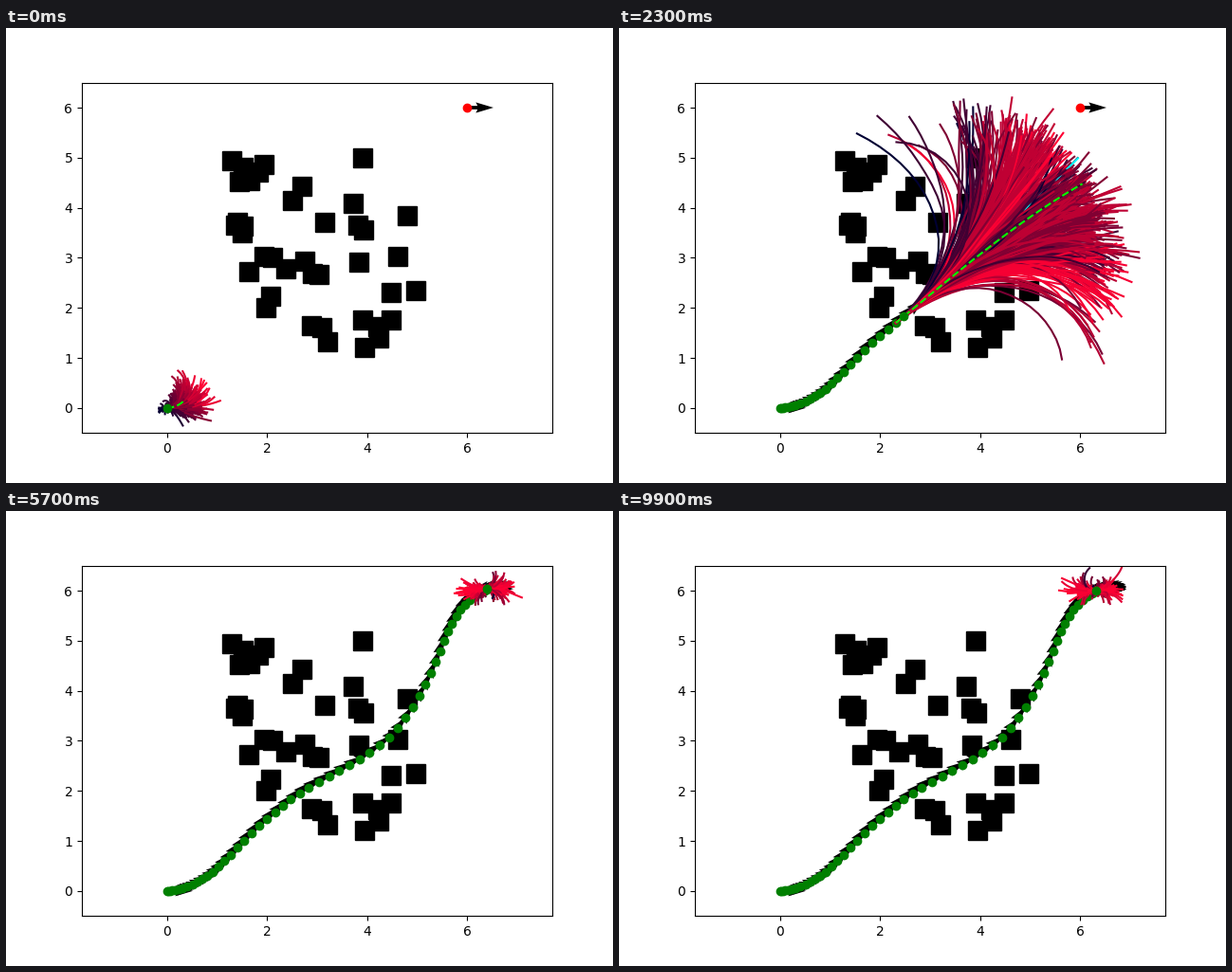
Recreate the animation shown at these times as a matplotlib script. Size 640 by 480 pixels, loop 10000 ms.

```python
import numpy as np
import matplotlib.pyplot as plt
from matplotlib.animation import FuncAnimation
from matplotlib.collections import LineCollection

FRAMES, HORIZON, SAMPLES = 100, 20, 500
GOAL = np.array([6.0, 6.0])
HIT_RADIUS = 0.17
BEST = 330

OBSTACLES = np.array([
    (1.29, 4.94), (1.52, 4.81), (1.44, 4.53), (1.65, 4.55), (1.82, 4.72),
    (1.94, 4.87), (2.70, 4.43), (2.51, 4.15), (3.91, 4.99), (3.72, 4.08),
    (4.80, 3.84), (3.15, 3.70), (3.82, 3.66), (3.93, 3.56), (1.37, 3.66),
    (1.41, 3.70), (1.53, 3.63), (1.50, 3.50), (1.94, 3.02), (2.11, 3.00),
    (1.63, 2.73), (2.38, 2.78), (2.76, 2.93), (2.91, 2.69), (3.04, 2.67),
    (3.84, 2.91), (4.61, 3.02), (4.48, 2.31), (4.97, 2.35), (2.07, 2.23),
    (1.98, 2.01), (2.88, 1.64), (3.09, 1.61), (3.21, 1.33), (3.91, 1.75),
    (3.95, 1.20), (4.21, 1.62), (4.23, 1.39), (4.48, 1.75)])

# Robot position every third step until it settles near the goal
WAYPOINTS = np.array([
    (0, 0), (0.10, 0.01), (0.32, 0.06), (0.61, 0.18), (0.91, 0.38),
    (1.27, 0.72), (1.69, 1.155), (2.16, 1.57), (2.65, 1.95), (3.24, 2.29),
    (3.845, 2.633), (4.432, 3.068), (4.905, 3.674), (5.275, 4.347),
    (5.54, 5.0), (5.777, 5.492), (6.04, 5.814), (6.307, 5.985), (6.40, 6.03)])
WAY_STEP = 3
SETTLED = WAY_STEP * (len(WAYPOINTS) - 1)

# step, planned end speed, linear and quadratic turn over the horizon
PLANS = np.array([
    (0, 0.028, 0.2, 0.6),
    (4, 0.20, 0.6, 0.2),
    (9, 0.31, 0.5, -0.2),
    (15, 0.205, -0.1, -0.75),
    (23, 0.245, 0.1, -0.25),
    (33, 0.232, 1.7, -1.9),
    (38, 0.12, 0.5, -1.2),
    (45, 0.0, -1.2, 0.0),
    (54, 0.0, 0.0, 0.0)])


def hermite(points, s):
    slopes = np.gradient(points, axis=0)
    i = np.minimum(s.astype(int), len(points) - 2)
    u = (s - i)[:, None]
    return ((2 * u**3 - 3 * u**2 + 1) * points[i] + (u**3 - 2 * u**2 + u) * slopes[i]
            + (3 * u**2 - 2 * u**3) * points[i + 1] + (u**3 - u**2) * slopes[i + 1])


def build_route():
    steps = np.arange(FRAMES)
    drive = steps[:SETTLED + 1]
    pos = np.empty((FRAMES, 2))
    pos[:SETTLED + 1] = hermite(WAYPOINTS, drive / WAY_STEP)
    sway = np.cos(2 * np.pi * (steps[SETTLED + 1:] - 55.5) / 29)
    pos[SETTLED + 1:] = np.c_[6.355 + 0.045 * sway, 6.015 + 0.015 * sway]

    vel = np.gradient(pos[:SETTLED + 1], axis=0)
    tangent = np.arctan2(vel[:, 1], vel[:, 0])
    tangent[0] = 0
    heading = 0.06 + 0.07 * np.sin(0.9 * steps)
    ease = np.clip((drive - 49) / 6, 0, 1)
    heading[:SETTLED + 1] = (1 - ease) * tangent + ease * 0.06
    speed = np.zeros(FRAMES)
    speed[1:SETTLED + 1] = np.hypot(*vel[1:].T)
    return pos, heading, speed


POS, HEADING, SPEED = build_route()
LEAD = 0.08 * np.clip(np.arange(FRAMES) / 8, 0, 1) * (np.arange(FRAMES) <= SETTLED)


def rollout(start, theta, speed):
    moves = np.stack([speed * np.cos(theta), speed * np.sin(theta)], axis=-1)
    origin = np.zeros_like(moves[:, :1])
    return start + np.concatenate([origin, np.cumsum(moves, axis=1)], axis=1)


def sample_paths(t):
    """Plan and noisy rollouts from the state before step t, with colours."""
    s = max(t - 1, 0)
    end_speed, turn, bend = (np.interp(t, PLANS[:, 0], c) for c in PLANS[:, 1:].T)
    u = np.arange(1, HORIZON + 1) / HORIZON
    theta = HEADING[s] + turn * u + bend * u**2
    speed = SPEED[s] + (end_speed - SPEED[s]) * (2 * u - u**2)

    rng = np.random.default_rng(t)
    shape = (SAMPLES, HORIZON)
    accel = rng.normal(0, 0.0045, shape)
    spin = rng.normal(0, 0.0145, shape)
    accel[BEST] = 0.0012
    spin[BEST] = 0.0012 * np.sin(1.4 * t + 1)
    swerve = np.cumsum(np.cumsum(spin, axis=1), axis=1)
    paths = rollout(POS[s], theta + swerve, speed + np.cumsum(accel, axis=1))
    plan = rollout(POS[s], theta[None], speed[None])[0]

    gap = np.linalg.norm(paths[:, :, None] - OBSTACLES, axis=-1)
    hits = (gap < HIT_RADIUS).any(axis=2).sum(axis=1)
    dist = np.linalg.norm(paths[:, -1] - GOAL, axis=1)
    near = np.linalg.norm(POS[s] - GOAL) < 1.2
    cost = hits + 0.05 * dist + near * swerve[:, -1]**2
    good = 1 - (cost - cost.min()) / np.ptp(cost)
    colors = np.c_[good, np.zeros(SAMPLES), np.full(SAMPLES, 0.2)]
    colors[BEST] = (0, 1, 1)
    return plan, paths, colors


def arrows(ax, pos, angle):
    ax.quiver(pos[:, 0], pos[:, 1], np.cos(angle), np.sin(angle),
              scale=18, width=0.0075)


fig, ax = plt.subplots(figsize=(6.4, 4.8), dpi=100)


def draw(t):
    ax.clear()
    ax.set_xlim(-1.697, 7.697)
    ax.set_ylim(-0.5, 6.5)
    ax.set_xticks(range(0, 7, 2))
    ax.set_yticks(range(7))
    ax.plot(*OBSTACLES.T, "ks", markersize=15)
    ax.plot(*GOAL, "ro")
    arrows(ax, GOAL[None], np.zeros(1))

    arrows(ax, POS[:t + 1], (HEADING + LEAD)[:t + 1])
    ax.plot(*POS[:max(t, 1)].T, "go")
    plan, paths, colors = sample_paths(t)
    ax.add_collection(LineCollection(paths, colors=colors, linewidths=1.5,
                                     capstyle="projecting", zorder=2),
                      autolim=False)
    ax.plot(*plan.T, "--", color="lime")
    ax.plot(*POS[t], "go")
    return []


anim = FuncAnimation(fig, draw, frames=FRAMES, interval=100,
                     init_func=lambda: [], repeat=True, repeat_delay=0)
plt.show()
```
